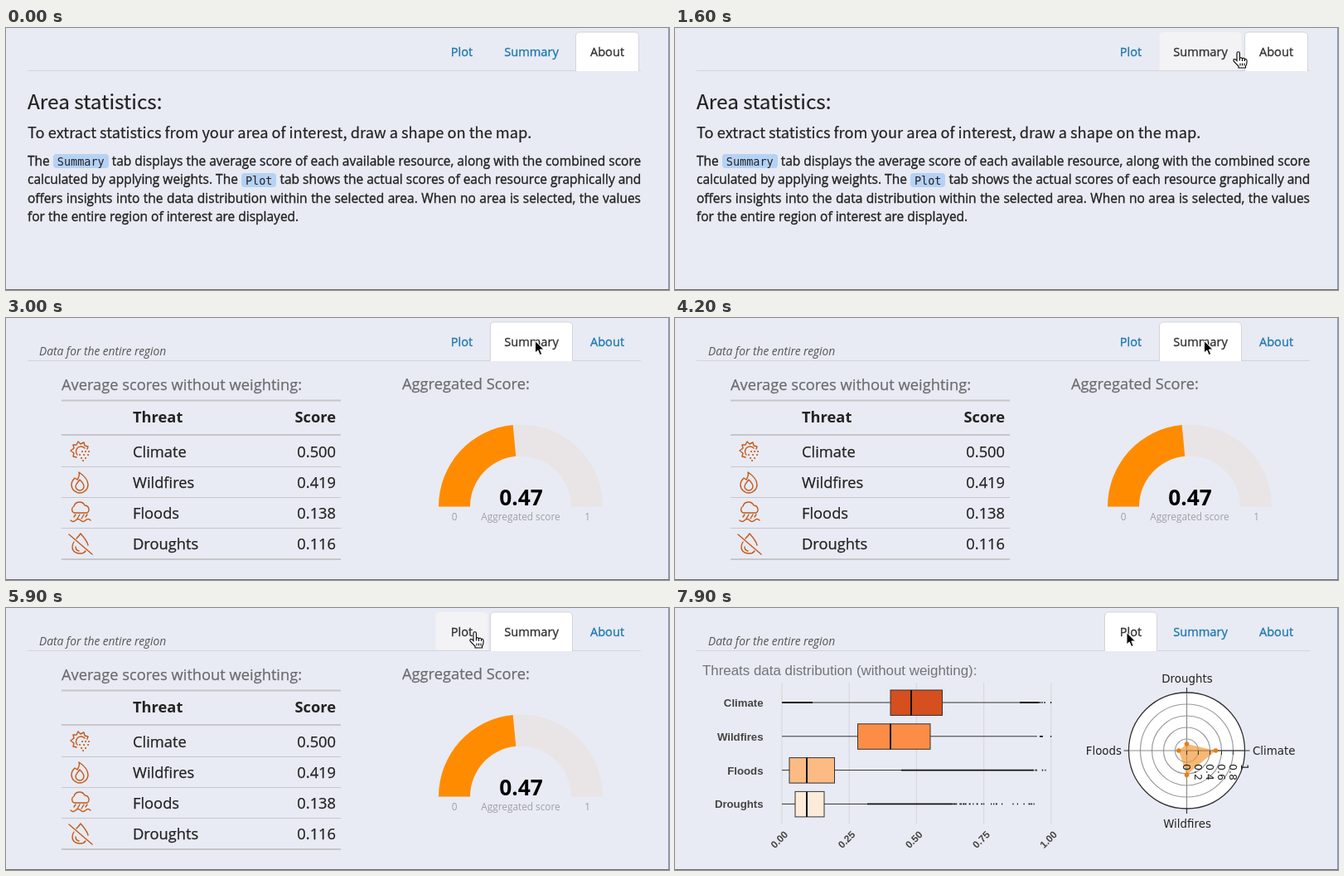
These frames come from a looping animation (800x316 px, 8000 ms). An HTML page:

```html
<!DOCTYPE html>
<html lang="en">
<head>
<meta charset="utf-8">
<title>Area statistics</title>
<style>
html, body { margin: 0; width: 100%; height: 100%; overflow: hidden; background: #e8ebf3; }
svg { display: block; width: 800px; height: 316px; font-family: "Open Sans", "Noto Sans", sans-serif; fill: #222; }
.head { font-family: "Noto Sans CJK JP", "Noto Sans CJK SC", "Noto Sans", sans-serif; stroke: #222; stroke-width: .2px; }
.para div { font: 15.5px/22.5px "Open Sans", "Noto Sans", sans-serif; color: #222; white-space: nowrap; -webkit-text-stroke: .35px #222; }
.para div:not(:last-child) { text-align: justify; text-align-last: justify; }
code { font: 13.5px "DejaVu Sans Mono", monospace; background: #b5d2f5; border-radius: 4px; padding: .5px 5px; -webkit-text-stroke: 0; }
.tab { font-size: 14.6px; text-anchor: middle; fill: #1f78b4; }
.tab text { stroke: #1f78b4; stroke-width: .35px; }
.tab path { fill: none; }
.tab.hover, .tab.active { fill: #333; }
.tab.hover text, .tab.active text { stroke: #333; }
.tab.hover path { fill: #f3f2f4; }
.tab.active path { fill: #fff; stroke: #d3d5db; }
.title { font-size: 18.3px; fill: #6b6b6f; stroke: #6b6b6f; stroke-width: .25px; }
.table { font-size: 18.3px; stroke: #222; stroke-width: .25px; }
.rules { stroke: #c6c6ca; }
.icon { fill: none; stroke: #c4581a; stroke-width: 1.4; stroke-linecap: round; stroke-linejoin: round; }
.end { text-anchor: end; }
.mid { text-anchor: middle; }
.bold { font-weight: 700; }
.table .bold { stroke: none; }
.arial { font-family: "Liberation Sans", Arial, sans-serif; }
.radar { font-family: "DejaVu Sans", Verdana, sans-serif; font-size: 13.4px; }
</style>
</head>
<body>
<svg viewBox="0 0 800 316">
  <g id="tabs"></g>
  <path id="baseline" stroke="#d3d5db"/>

  <g id="about">
    <text class="head" x="26" y="98" font-size="24.400">Area statistics:</text>
    <text class="head" x="26" y="133" font-size="18.250">To extract statistics from your area of interest, draw a shape on the map.</text>
    <foreignObject x="26" y="148.500" width="740" height="100">
      <div class="para">
        <div>The <code>Summary</code> tab displays the average score of each available resource, along with the combined score</div>
        <div>calculated by applying weights. The <code>Plot</code> tab shows the actual scores of each resource graphically and</div>
        <div>offers insights into the data distribution within the selected area. When no area is selected, the values</div>
        <div>for the entire region of interest are displayed.</div>
      </div>
    </foreignObject>
  </g>

  <text id="note" x="40" y="45" font-size="13.800" font-style="italic" fill="#555">Data for the entire region</text>

  <g id="summary">
    <text class="title" x="67" y="87">Average scores without weighting:</text>
    <text class="title" x="478" y="86">Aggregated Score:</text>
    <g class="rules">
      <path d="M67 99.500H404M67 141H404M67 291H404" stroke-width="2"/>
      <path d="M67 179.500H404M67 216.500H404M67 253.500H404"/>
    </g>
    <g class="table" id="table">
      <text class="bold" x="153" y="126">Threat</text>
      <text class="bold end" x="398" y="126">Score</text>
    </g>
    <g class="icon">
      <path d="M85 168l-4-1 1-4-4-3 4-3-1-4 4 0 2-4 3 3 4-2 1 4 4 1-1 3M86 165a6 6 0 1 1 9-8"/>
      <path d="M92 161h.1M96 161h.1M100 161h.1M89 165h.1M94 165h.1M99 165h.1M91 169h.1M96 169h.1M93 172h.1" stroke-width="2"/>
      <path d="M88 186c6 4 11 9 11 15a10 10 0 0 1-20 0c0-4 2-6 4-8l3 2c2-3 3-6 2-9zM89 195c3 3 5 5 5 8a5 5 0 0 1-10 0c0-3 3-5 5-8z"/>
      <path d="M82 235a4.500 4.500 0 0 1 0-8a7 7 0 0 1 13-1a5 5 0 0 1 3 9zM84 237l-2 3M89 237l-3 5M94 237l-3 5M98 237l-2 3M78 244q3 3 6 0t6 0 6 0 6 0"/>
      <path d="M76 261l28 24M85 266q3-3 5-6 8 9 9 14M82 270c-4 7-2 14 8 14q4 0 6-3M84 276q0 4 4 5"/>
    </g>
    <path id="track" fill="#e9e4e5"/>
    <path id="gauge" fill="#ff8c00"/>
    <text class="mid bold" x="621.500" y="226" font-size="26.300" fill="#000">0.47</text>
    <g class="mid" font-size="11.800" fill="#a0a0a4">
      <text x="541" y="244">0</text>
      <text x="621" y="244">Aggregated score</text>
      <text x="701.500" y="244">1</text>
    </g>
  </g>

  <g id="plot">
    <text class="arial" x="33" y="81" font-size="16.900" fill="#737377">Threats data distribution (without weighting):</text>
    <g class="arial bold end" id="boxes" fill="#444"></g>
    <g class="radar">
      <g id="rings" transform="translate(617.5 172)"></g>
      <text class="mid" x="618" y="90">Droughts</text>
      <text class="mid" x="618" y="265">Wildfires</text>
      <text class="end" x="539" y="176.500">Floods</text>
      <text x="697" y="176.500">Climate</text>
    </g>
  </g>

  <path d="M799.500 0V316" stroke="#8199cb"/>
  <path d="M0 315.500H800" stroke="#68696d"/>
  <g id="cursor">
    <path id="arrow" d="M0 0V14.500L3.300 11.500 5.700 17 8.200 16 5.800 10.500H10.500Z" fill="#000" stroke="#fff"/>
    <path id="hand" d="M-2 10V1A1.600 1.600 0 0 1 1.400 1V7Q3 5.500 4.500 7.300 6.200 6 7.500 8 9.800 7.500 10 9.500V12Q10 15 8.500 16.500V18.500H0V16.500L-5.500 11Q-7 8.500-5 8-3.500 8-2 10ZM1.400 7V10M4.500 7.500V10.500M7.500 8V10.500M2 13V16M4.500 13V16M7 13V16" fill="#fff" stroke="#000" stroke-width="1.100"/>
  </g>
</svg>
<script>
const $ = id => document.getElementById(id);
const add = (id, markup) => $(id).insertAdjacentHTML('beforeend', markup);

const tabs = [['plot', 'Plot', 518.5, 581.5], ['summary', 'Summary', 584.5, 683.5], ['about', 'About', 687.5, 763.5]];
for (const [id, label, l, r] of tabs)
  add('tabs', `<g class="tab" id="tab-${id}"><path d="M${l} 52V10q0-5 5-5H${r - 5}q5 0 5 5V52"/>
    <text x="${(l + r) / 2}" y="33.500">${label}</text></g>`);

[['Climate', '0.500'], ['Wildfires', '0.419'], ['Floods', '0.138'], ['Droughts', '0.116']].forEach(([name, score], i) => {
  const y = 167.5 + i * 37.2;
  add('table', `<text x="153" y="${y}">${name}</text><text class="end" x="398" y="${y}">${score}</text>`);
});

// Half ring filled from the left up to a share of its sweep
function ring(share) {
  const at = r => `${621 - r * Math.cos(Math.PI * share)} ${227.5 - r * Math.sin(Math.PI * share)}`;
  return `M522 227.5A99 99 0 0 1 ${at(99)}L${at(61)}A61 61 0 0 0 560 227.5Z`;
}
$('track').setAttribute('d', ring(1));
$('gauge').setAttribute('d', ring(0.47));

let seed = 7;
const random = () => (seed = seed * 16807 % 2147483647) / 2147483647;

for (let i = 0; i < 5; i++) {
  const x = 129 + i * 81.2;
  add('boxes', `<path d="M${x} 90V260" stroke="#d9dade" stroke-width="1.300"/>
    <text transform="translate(${x + 8} 274) rotate(-45)" font-size="12">${(i / 4).toFixed(2)}</text>`);
}
// name, fill, quartile 1, median, quartile 3, whisker end, dense outliers end, sparse outliers end, sparse count
[
  ['Climate', '#d64f1e', 260, 285, 322.5, 416, 437, 447, 7],
  ['Wildfires', '#fb8d47', 220.5, 260, 308, 437, 437, 447, 5],
  ['Floods', '#fdbb84', 138, 159, 192.5, 273, 433, 453, 5],
  ['Droughts', '#fdebd9', 145, 159, 180, 232, 335, 446, 38]
].forEach(([name, fill, q1, median, q3, whisker, dense, sparse, count], i) => {
  const y = 114 + i * 40.8;
  let dots = '';
  for (let n = 0; n < count; n++) dots += `M${dense + (sparse - dense) * random() ** 2} ${y}h1.200`;
  if (i < 2) dots += `M453 ${y}h1.200`;
  if (!i) dots += `M129 ${y}H166`;
  add('boxes', `<text x="106.500" y="${y + 5}" font-size="13.200">${name}</text>
    <path d="M129 ${y}H${whisker}" stroke="#333"/>
    <path d="M${whisker} ${y}H${dense}${dots}" stroke="#111" stroke-width="1.800"/>
    <rect x="${q1}" y="${y - 15}" width="${q3 - q1}" height="30.500" fill="${fill}" stroke="#333"/>
    <path d="M${median} ${y - 15}v30.500" stroke="#111" stroke-width="2"/>`);
});

add('rings', '<circle r="70" fill="#fff"/>');
for (let r = 14; r < 70; r += 14) add('rings', `<circle r="${r}" fill="none" stroke="#9a9a9e" stroke-width="1.200"/>`);
add('rings', `<path d="M-70 0H70M0-70V70" stroke="#8c8c90" stroke-width="1.200"/>
  <circle r="70" fill="none" stroke="#333" stroke-width="1.300"/>
  <path d="M-70 0h-6M70 0h6M0-70v-6M0 70v6M0 0H70" stroke="#333" stroke-width="1.200"/>
  <path d="M35 0L0-8-9.700 0 0 29.300Z" fill="#f29a3c" fill-opacity=".7"/>`);
for (const [x, y] of [[35, 0], [0, -8], [-9.7, 0], [0, 29.3]])
  add('rings', `<circle cx="${x}" cy="${y}" r="2.800" fill="#e67e14"/>`);
for (let i = 0; i < 6; i++)
  add('rings', `<path d="M${i * 14} 0v5" stroke="#333"/>
    <text transform="translate(${i * 14 - 5} 16) rotate(90)" font-size="12.500">${i / 5}</text>`);

// time, x, y of the pointer tip
const path = [[0, 741, -17], [900, 724, 27], [1600, 680, 29.5], [1800, 662, 29.5], [2300, 638.5, 27.5],
  [4700, 638.5, 27.5], [5900, 566, 29.5], [6300, 545, 29.5], [8000, 545, 29.5]];

function pointer(t) {
  const i = path.findIndex(p => p[0] > t);
  const [t0, x0, y0] = path[i - 1], [t1, x1, y1] = path[i];
  const k = (t - t0) / (t1 - t0);
  return [x0 + (x1 - x0) * k, y0 + (y1 - y0) * k];
}

const show = (id, on) => $(id).style.display = on ? '' : 'none';

function draw(now) {
  const t = Math.floor(now % 8000 / 100) * 100;
  const active = t < 2900 ? 'about' : t < 7700 ? 'summary' : 'plot';
  const [x, y] = pointer(t);
  let hand = false;
  for (const [id, , l, r] of tabs) {
    const hover = id !== active && x > l && x < r && y > 5 && y < 51;
    hand ||= hover;
    $('tab-' + id).setAttribute('class', 'tab' + (id === active ? ' active' : hover ? ' hover' : ''));
    show(id, id === active);
    if (id === active) $('baseline').setAttribute('d', `M26 51.5H${l}M${r} 51.5H766`);
  }
  show('note', active !== 'about');
  show('hand', hand);
  show('arrow', !hand);
  $('cursor').setAttribute('transform', `translate(${x} ${y})`);
  requestAnimationFrame(draw);
}
draw(performance.now());
</script>
</body>
</html>
```
